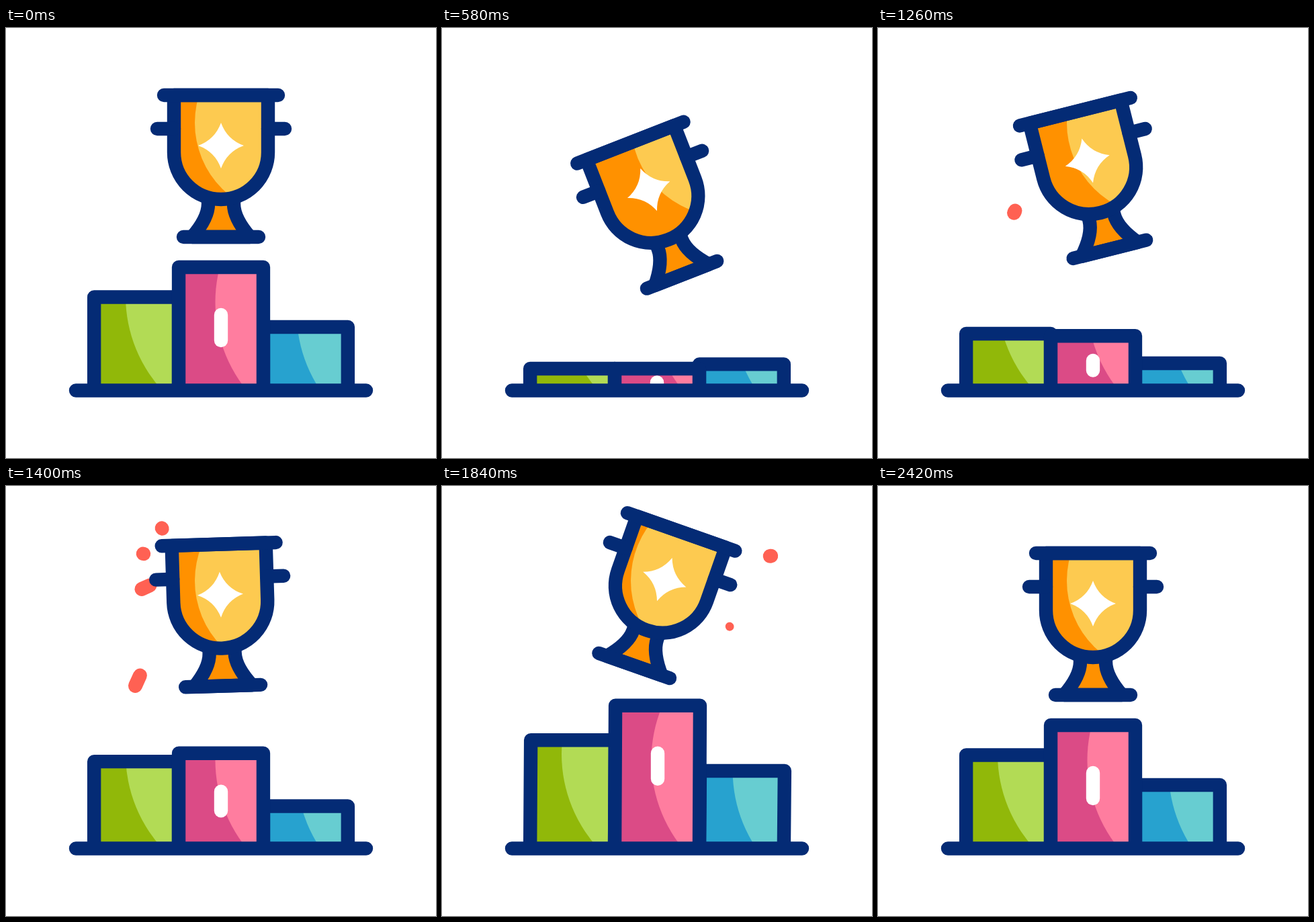
An HTML page with a canvas that plays this animation: 640x640 px, repeating every 2.62 s.

```html
<!DOCTYPE html>
<html lang="en">
<head>
<meta charset="utf-8">
<title>Podium</title>
<style>
html, body { margin: 0; width: 100%; height: 100%; overflow: hidden; background: #fff; }
canvas { display: block; width: 100vw; height: 100vh; }
</style>
</head>
<body>
<canvas id="stage" width="640" height="640"></canvas>
<script>
const ctx = document.getElementById('stage').getContext('2d');
const LOOP = 2620, CENTER = 320, FLOOR = 539.5, BOX_WIDTH = 125.9, STROKE = 20.4;
const NAVY = '#042b75', ORANGE = '#ff9100', YELLOW = '#fdca50', CORAL = '#ff6153';

const ease = v => {
  const x = Math.min(1, Math.max(0, v));
  return x * x * (3 - 2 * x);
};

// Every part sinks, springs past its rest, then settles; parts differ in when.
function swing(t, { rest, low, high, starts: [fall, rise, settle] }, fallTime) {
  return rest
    + (low - rest) * ease((t - fall) / fallTime)
    + (high - low) * ease((t - rise) / 640)
    + (rest - high) * ease((t - settle) / 480);
}

const low = 507;
const boxes = {
  green: { slot: -1, dark: '#91b809', light: '#b2db55', glow: [178, 399],
    rest: 400.5, low, high: 368, starts: [0, 995, 1662] },
  blue: { slot: 1, dark: '#27a2cf', light: '#67cdd1', glow: [432.6, 423.4],
    rest: 445, low, high: 424, starts: [222, 1138, 1832] },
  pink: { slot: 0, dark: '#db4b86', light: '#ff7d9f', glow: [311.5, 408],
    rest: 356, low, high: 317, starts: [41, 1049, 1684] }
};
const lift = { rest: 0, low: 73, high: -38, starts: [157, 956, 1820] };
const tilt = { rest: 0, low: -21.3, high: 19.5, starts: [0, 1090, 1818] };

const sparks = [
  { x: 204, y: 272, start: 1213 },
  { x: 214, y: 148, start: 1298 },
  { x: 205, y: 101, start: 1375 },
  { x: 232.5, y: 63.5, start: 1375 },
  { x: 460, y: 108.5, start: 1551 },
  { x: 428, y: 209, start: 1825 }
];

const cup = new Path2D('M250 100V185A70 70 0 0 0 390 185V100Z');
const stem = new Path2D('M277 311Q301 283 301 262V250H339V262Q339 283 363 311Z');
const bars = new Path2D('M235 100H405M225 150H250M390 150H415M264 311H376');
const star = new Path2D('M320 141Q329 166 354 175Q329 184 320 209Q311 184 286 175Q311 166 320 141Z');

function fill(path, color) {
  ctx.fillStyle = color;
  ctx.fill(path);
}

function stroke(path, color = NAVY, width = STROKE) {
  ctx.strokeStyle = color;
  ctx.lineWidth = width;
  ctx.stroke(path);
}

function line(x0, y0, x1, y1, color, width) {
  const path = new Path2D();
  path.moveTo(x0, y0);
  path.lineTo(x1, y1 + 0.01);
  stroke(path, color, width);
}

// Light area: a disc known by its leftmost point, fixed to the stage.
function glow(left, y, radius, color) {
  const disc = new Path2D();
  disc.arc(left + radius, y, radius, 0, Math.PI * 2);
  fill(disc, color);
}

function drawBox(box, top, lean) {
  const left = CENTER + (box.slot - 0.5) * BOX_WIDTH, right = left + BOX_WIDTH;
  const shape = new Path2D();
  shape.moveTo(left, FLOOR - 1);
  shape.lineTo(left + lean, top);
  shape.lineTo(right + lean, top);
  shape.lineTo(right, FLOOR - 1);
  fill(shape, box.dark);
  ctx.save();
  ctx.clip(shape);
  glow(...box.glow, 208, box.light);
  ctx.restore();
  stroke(shape);
}

// The white mark moves with its box and shortens as the box is squashed.
function drawMark(drop, lean) {
  const squash = Math.max(0, drop);
  const y = 446 + drop - squash * 0.45;
  const half = 19 - squash * 0.115;
  line(CENTER + lean, y - half, CENTER + lean, y + half, '#fff', STROKE);
}

function drawPodium(t) {
  const topOf = box => swing(t, box, 450);
  const drop = topOf(boxes.pink) - boxes.pink.rest;
  const lean = Math.max(0, -drop) * 0.035;
  for (const box of Object.values(boxes)) drawBox(box, topOf(box), lean);
  drawMark(drop, lean);
  line(104, FLOOR, 536, FLOOR, NAVY, STROKE);
}

function drawTrophy(t) {
  ctx.save();
  ctx.translate(CENTER, 209 + swing(t, lift, 550));
  ctx.rotate(swing(t, tilt, 550) * Math.PI / 180);
  ctx.translate(-CENTER, -209);
  fill(stem, ORANGE);
  stroke(stem);
  fill(cup, ORANGE);
  ctx.save();
  ctx.clip(cup);
  ctx.resetTransform();
  glow(281, 141, 139, YELLOW);
  ctx.restore();
  stroke(cup);
  stroke(bars);
  fill(star, '#fff');
  ctx.restore();
}

// A dash shoots away from the near side of the cup; its tail catches up.
function drawSpark({ x, y, start }, t) {
  const p = (t - start) / 320;
  if (p <= 0 || p >= 1) return;
  const angle = Math.atan2(y - 122, x - CENTER - 48 * Math.sign(x - CENTER));
  const dx = 30 * Math.cos(angle), dy = 30 * Math.sin(angle);
  const head = ease(p / 0.7), tail = ease((p - 0.3) / 0.7);
  const width = 21 * Math.min(1, p * 12, (1 - p) * 12);
  line(x + tail * dx, y + tail * dy, x + head * dx, y + head * dy, CORAL, width);
}

function draw(t) {
  ctx.fillStyle = '#fff';
  ctx.fillRect(0, 0, 640, 640);
  ctx.lineCap = ctx.lineJoin = 'round';
  drawPodium(t);
  sparks.forEach(spark => drawSpark(spark, t));
  drawTrophy(t);
}

const begin = performance.now();
function tick() {
  draw((performance.now() - begin) % LOOP);
  requestAnimationFrame(tick);
}
tick();
</script>
</body>
</html>
```
